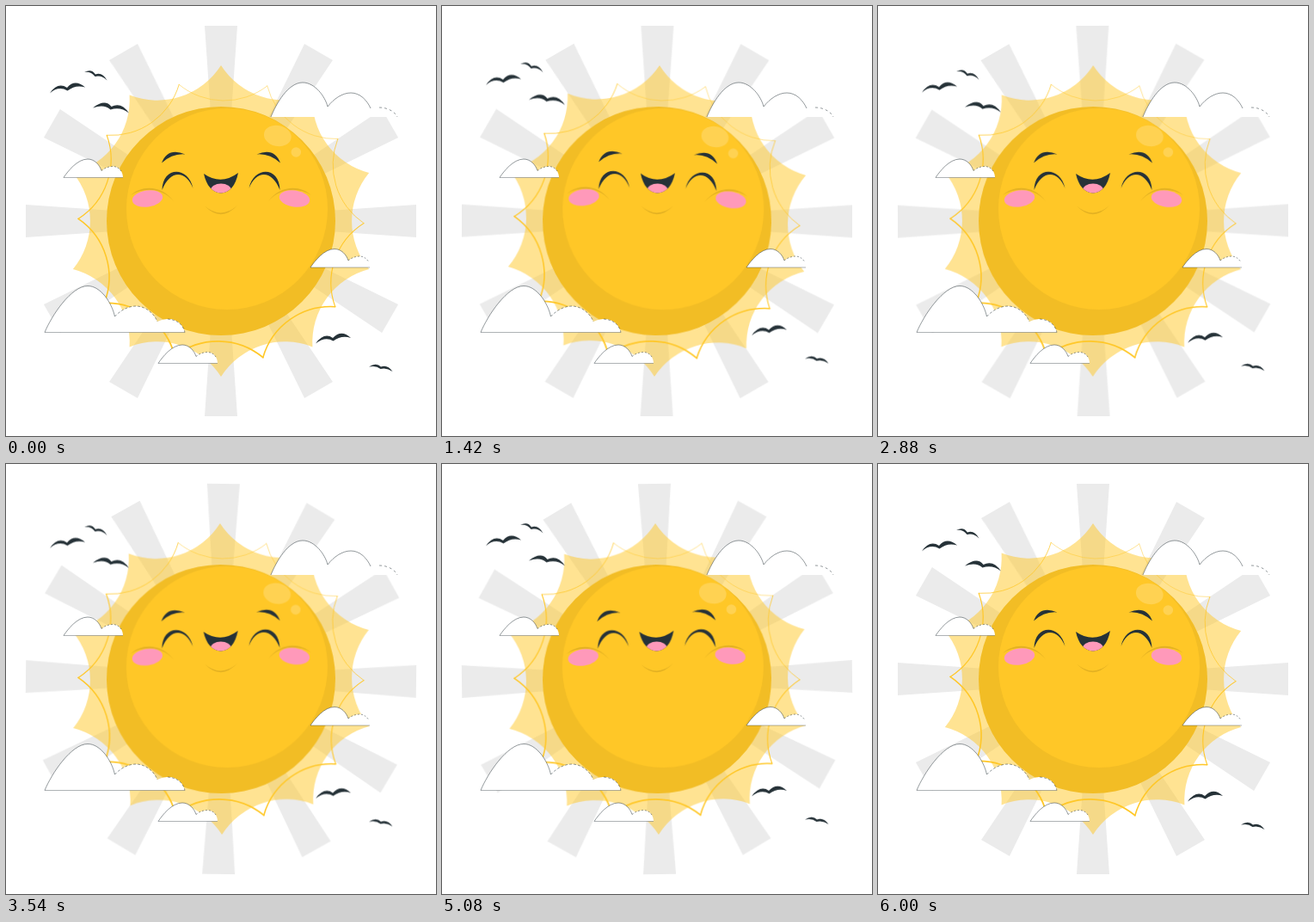
An HTML page for the animation above (6.04 s loop, 500 by 500 pixels).

```html
<!DOCTYPE html>
<html lang="en">
<head>
<meta charset="utf-8">
<title>Smiling sun</title>
<style>
  html, body { margin: 0; width: 100%; height: 100%; overflow: hidden; background: #fff; }
  svg { display: block; width: 100vw; height: 100vh; }
  .spin { transform-origin: 250px 250px; }
  #sun, #rays, #birds { animation: sway 6040ms linear infinite; }
  #rays { animation-name: rock; }
  #birds { animation-name: float; }

  /* 6 s cycle followed by a 40 ms rest */
  @keyframes sway {
    0%, 99.338%, 100% { transform: rotate(0deg); }
    24.834% { transform: rotate(1deg); }
    74.503% { transform: rotate(-1deg); }
  }
  @keyframes rock {
    0%, 99.338%, 100% { transform: rotate(0deg); }
    12.417%, 62.086% { transform: rotate(1deg); }
    37.252%, 86.921% { transform: rotate(-1deg); }
  }
  @keyframes float {
    0%, 49.669%, 99.338%, 100% { transform: translateY(0); }
    24.834%, 74.503% { transform: translateY(-10px); }
  }

  #rays { fill: #ebebeb; }
  #birds, .ink { fill: #263238; }
  .shade { fill: #e3b122; }
  .pink { fill: #ff99ba; }
  .glow { fill: #fff; opacity: .2; }
  .cloud { fill: #fff; }
  .edge { fill: none; stroke: #263238; stroke-width: .5; }
  .base { fill: none; stroke: #263238; stroke-width: .5; opacity: .75; }
  #rim { fill: none; stroke: #ffc727; stroke-linecap: round; }
</style>
</head>
<body>
<svg viewBox="0 0 500 500">
  <defs>
    <clipPath id="lips"><path d="M230 195Q250 209 270 194C267 209 260 217 250 217.5C240 217 233 209 230 195Z"/></clipPath>
    <g id="half">
      <path class="ink" d="M181 182.5Q188 164 208.500 172.500Q194 171 181 182.500Z"/>
      <path class="ink" d="M181.500 214C182 186 212 186 217.500 212C209 191 191 190 181.500 214Z"/>
      <path class="shade" d="M145 220C158 208 181 208 195 227C181 211 160 210.500 145 220Z"/>
      <ellipse class="pink" cx="164.500" cy="224" rx="17.800" ry="9.500" transform="rotate(-8 164.500 224)"/>
    </g>
    <g id="puff">
      <path class="cloud" d="M67 199.500C72 192 83 178 95 178C103 178 109 185 111 191.500C115 188 120 186.500 125 186.500C132 187 136 193 136 199.500Z"/>
      <path class="edge" d="M67 199.500C72 192 83 178 95 178C103 178 109 185 111 191.500"/>
      <path class="edge" d="M111 191.500C115 188 120 186.500 125 186.500C129 187 132 189 134 192" stroke-dasharray="2 2"/>
      <path class="base" d="M67 199.500H136"/>
    </g>
  </defs>

  <g id="rays" class="spin"></g>

  <g id="sun" class="spin">
    <path id="corona" fill="#ffc727" opacity=".5"/>
    <g id="rim"></g>
    <circle cx="250" cy="250" r="133" fill="#f2bd25"/>
    <circle cx="257" cy="236" r="117" fill="#ffc727"/>
    <ellipse class="glow" cx="315.800" cy="151" rx="16" ry="12" transform="rotate(12 316 151)"/>
    <circle class="glow" cx="337.300" cy="170" r="5.800"/>
    <use href="#half"/>
    <use href="#half" transform="matrix(-1 0 0 1 500 0)"/>
    <g clip-path="url(#lips)">
      <rect class="ink" x="225" y="190" width="50" height="30"/>
      <ellipse class="pink" cx="250" cy="214" rx="12" ry="7.500"/>
    </g>
    <path class="shade" d="M231 232.500Q250 252 269 232Q250 248.500 231 232.500Z"/>
  </g>

  <g id="clouds">
    <path class="cloud" d="M308 129C314 114 328 89 345 89C359 89 371 105 374 117C381 108 391 101 401 101C412 101 420 110 424 119C428 117.500 434 117 439 118C447 119 453 124 455 129Z"/>
    <path class="edge" d="M308 129C314 114 328 89 345 89C359 89 371 105 374 117C381 108 391 101 401 101C412 101 420 110 424 119"/>
    <path class="edge" d="M434 118C445 118 453 124 455 129" stroke-dasharray="3 3"/>
    <path class="cloud" d="M45 379.500C53 360 76 325.500 95 325.500C110 325.500 123 345 126.500 361C134 353 143 349 151 349C162 349 172 357 176 367C181 364.500 186 364 191 364C200 365 206 371 208 379.500Z"/>
    <path class="edge" d="M45 379.500C53 360 76 325.500 95 325.500C110 325.500 123 345 126.500 361"/>
    <path class="edge" d="M126.500 361C134 353 143 349 151 349C162 349 172 357 176 367M188 364C200 365 206 371 208 379.500" stroke-dasharray="3 2"/>
    <path class="base" d="M45 379.500H208"/>
    <use href="#puff"/>
    <use href="#puff" x="110" y="216"/>
    <use href="#puff" x="287" y="104.500"/>
  </g>

  <g id="birds">
    <path d="M51 101.500Q60 88 71 95Q80 84.500 92 94.500Q81 91 71.500 98.500Q61 92.500 51 101.500Z"/>
    <path d="M91 77Q99.500 72.500 104 79.500Q112 76.500 117.500 86.500Q111 80 103.500 82Q99 76 91 77Z"/>
    <path d="M101 118.500Q115 107.500 122.500 117Q134 111 143 124.500Q133 116.500 121.500 120.500Q114 113.500 101 118.500Z"/>
    <path d="M360 392.500Q370 379 380 386Q390 375.500 401 386Q390 382.500 380.500 389.500Q371 384 360 392.500Z"/>
    <path d="M422 419.500Q430.500 414 436 419.500Q443.500 416.500 449.500 425Q442.500 420 435.500 422Q430 417.500 422 419.500Z"/>
  </g>
</svg>
<script>
  const id = name => document.getElementById(name);
  const polar = (r, deg) => {
    const a = deg * Math.PI / 180;
    return (250 + r * Math.sin(a)).toFixed(2) + ' ' + (250 - r * Math.cos(a)).toFixed(2);
  };
  // concave edge between neighbouring spikes
  const arc = (r, bend, deg) => `A${bend} ${bend} 0 0 0 ${polar(r, deg)}`;

  let rays = '', rim = '', corona = 'M' + polar(181, 0);
  for (let i = 0; i < 12; i++) {
    rays += `<path d="M231 23H269L262 125H238Z" transform="rotate(${i * 30} 250 250)"/>`;
  }
  for (let i = 0; i < 10; i++) {
    const deg = 18.900 + i * 36;
    const width = 1.150 - 0.700 * Math.cos((deg - 2) * Math.PI / 180);
    corona += arc(181, 88, (i + 1) * 36);
    rim += `<path d="M${polar(166, deg)}${arc(166, 82, deg + 36)}" stroke-width="${width.toFixed(2)}"/>`;
  }
  id('rays').innerHTML = rays;
  id('rim').innerHTML = rim;
  id('corona').setAttribute('d', corona + 'Z');
</script>
</body>
</html>
```
